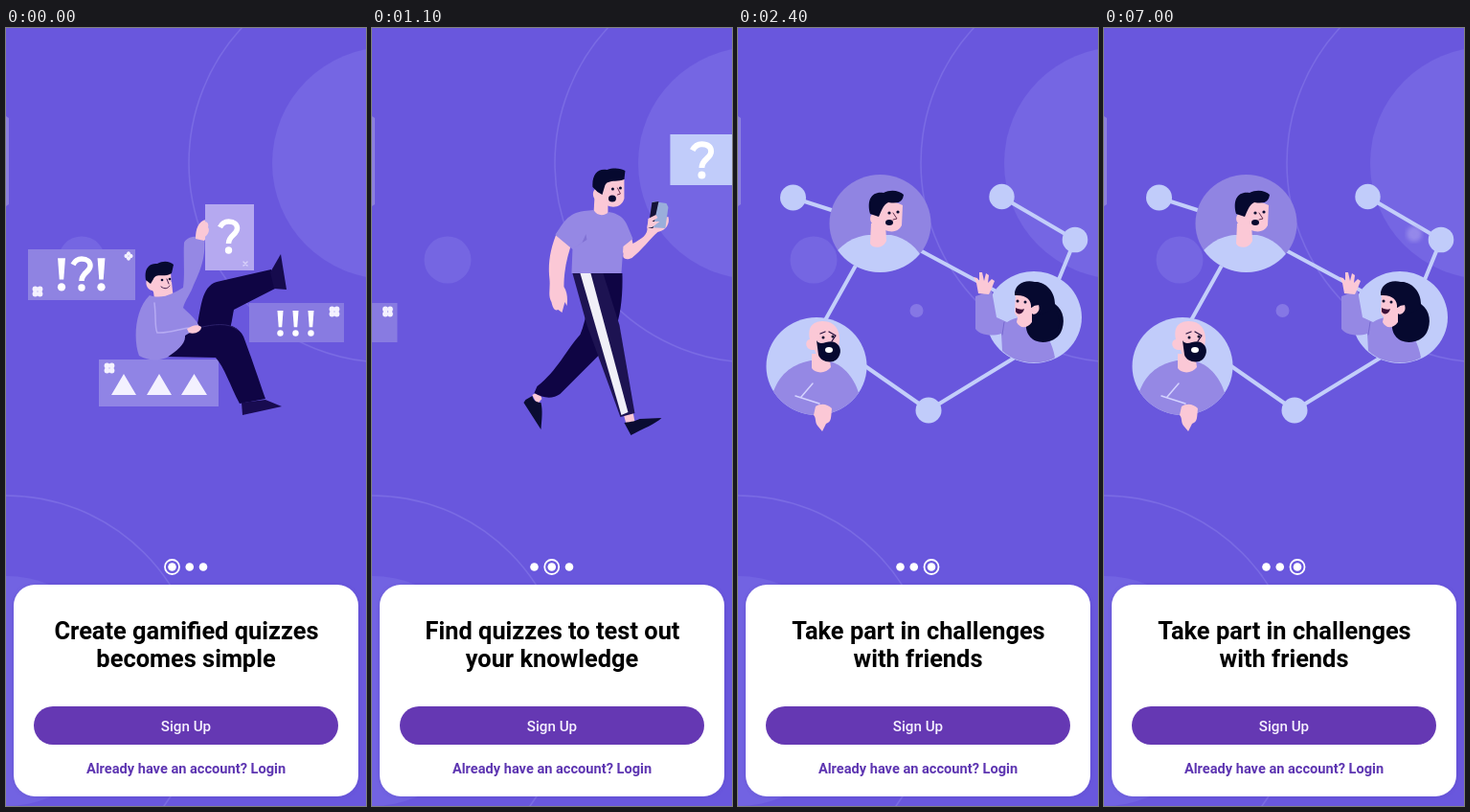
These frames come from a looping animation (376 px wide and 812 px high, 7.1 s). An HTML page:

```html
<!DOCTYPE html>
<html lang="en">
<head>
<meta charset="utf-8">
<title>Quiz onboarding</title>
<style>
html, body { margin: 0; width: 100%; height: 100%; overflow: hidden; background: #6957dd; }
svg { display: block; width: 100%; height: 100%; }
text { font-family: Roboto, Arial, sans-serif; text-anchor: middle; }
.title { font-size: 25.4px; font-weight: 700; }
.off { visibility: hidden; }
.skin { fill: #fbc8d6; }
.ink { fill: #06092f; }
.navy { fill: #0f0544; }
.shirt { fill: #9588e4; }
.pale { fill: #c1ccfa; }
.line { fill: none; stroke-linecap: round; stroke-linejoin: round; }
</style>
</head>
<body>
<svg viewBox="0 0 376 812">
  <defs>
    <g id="bang"><path d="M-3.500-15H3.500L2 5H-2Z"/><circle cy="12" r="3.700"/></g>
    <g id="ask">
      <path class="line" stroke="#fff" stroke-width="5.500" style="stroke-linecap:butt" d="M-9-10C-7-14-4-16 0-16C6-16 9-13 9-9C9-2 0-2 0 7"/>
      <circle cy="14" r="3.700" fill="#fff"/>
    </g>
    <g id="clover" fill="#f4f2ff">
      <circle cx="-2.500" cy="-2.500" r="2.900"/><circle cx="2.500" cy="-2.500" r="2.900"/>
      <circle cx="-2.500" cy="2.500" r="2.900"/><circle cx="2.500" cy="2.500" r="2.900"/>
    </g>
    <clipPath id="c1"><ellipse cx="148.500" cy="204" rx="53" ry="51"/></clipPath>
    <clipPath id="c2"><ellipse cx="82" cy="353" rx="52.500" ry="51"/></clipPath>
    <filter id="soft" x="-10%" y="-10%" width="120%" height="120%"><feGaussianBlur stdDeviation="2"/></filter>
  </defs>

  <rect width="376" height="812" fill="#6957dd"/>
  <circle cx="399" cy="141" r="121" fill="#7566e3"/>
  <circle cx="0" cy="692" r="120" fill="#7263e2"/>
  <g fill="none" stroke="#7a6be4" stroke-width="1.600">
    <circle cx="399" cy="141" r="208"/><circle cx="0" cy="692" r="204"/>
  </g>
  <circle cx="79" cy="242" r="24.500" fill="#7566e2"/>
  <path d="M0 92L3 94V184L0 186Z" fill="#8b7fdf"/>

  <g id="pages">
    <g>
      <rect x="23" y="231" width="112" height="53" fill="#8f83e2"/>
      <rect x="254" y="287" width="99" height="41" fill="#887be1"/>
      <rect x="97" y="346" width="125" height="49" fill="#9084e5"/>
      <g fill="#fff">
        <use href="#bang" transform="translate(58 257) scale(1.120)"/>
        <use href="#bang" transform="translate(99.500 257) scale(1.120)"/>
        <use href="#bang" transform="translate(286.500 308) scale(.87)"/>
        <use href="#bang" transform="translate(302.500 308) scale(.87)"/>
        <use href="#bang" transform="translate(318.500 308) scale(.87)"/>
      </g>
      <use href="#ask" transform="translate(79 257)"/>
      <use href="#clover" transform="translate(128 238) rotate(45) scale(.7)"/>
      <use href="#clover" x="33" y="275"/>
      <use href="#clover" x="343" y="296"/>
      <use href="#clover" x="108" y="355"/>
      <path d="M110 383L123 361L136 383ZM147 383L160 361L173 383ZM183 383L196.500 361L210 383Z" fill="#f3f1ff"/>

      <path class="navy" d="M199 314C204 291 204 270 220 265L277 252L281 272L238 294C236 303 236 310 232 318Z"/>
      <path d="M276 255L287 236L293 273L280 272Z" fill="#160b4d"/>
      <path class="navy" d="M168 343C178 333 186 315 204 311C225 306 242 309 248 322C256 343 265 370 271 387L244 392C234 373 228 354 219 344Z"/>
      <path d="M246 391L271 388L288 395L247 404Z" fill="#180b50"/>
      <path class="line" d="M201 313C217 309 232 307 242 315" stroke="#2b2069"/>

      <path class="skin" d="M153 268L173 265L175 284L156 290Z"/>
      <path class="shirt" d="M150 279C164 284 176 276 185 271C187 256 185 239 186 224C190 217 199 217 207 219C209 239 203 253 196 268C193 277 187 284 185 292C191 298 199 304 202 312L187 321C188 330 178 337 168 344C158 348 148 347 139 342C133 327 134 294 150 279Z"/>
      <path class="line" d="M155 287C157 302 155 313 158 318C170 319 181 314 191 313" stroke="#b6abf3" stroke-width="1.500"/>
      <path class="skin" d="M189 314C195 310 200 309 204 312C204 317 197 320 191 318Z"/>
      <path class="skin" d="M148 262C149 254 155 252 172 253L173 273C172 280 157 281 153 274C146 273 145 264 148 262Z"/>
      <path class="ink" d="M146 263C144 252 149 245 158 246C165 242 172 244 175 247L173 256C165 261 157 255 154 262L151 267Z"/>
      <circle class="ink" cx="163" cy="263" r="1.300"/><circle class="ink" cx="171" cy="262" r="1.300"/>
      <path class="line" d="M162 270C166 273 169 272 171 269M168 262L170 267" stroke="#44204d" stroke-width="1"/>

      <path class="skin" d="M198 220C198 210 201 201 209 200L213 208C211 213 210 219 207 222Z"/>
      <rect x="208" y="184" width="51" height="69" fill="#b5a9f0"/>
      <path class="skin" d="M206 203C211 200 212 206 211 208C214 212 209 219 205 219Z"/>
      <use href="#ask" transform="translate(232.500 218)"/>
      <path class="line" d="M248 244L252 248M252 244L248 248" stroke="#d8d1fa" stroke-width="1.500"/>
    </g>

    <g transform="translate(380)">
      <rect class="pale" x="258" y="111" width="68" height="53"/>
      <use href="#ask" transform="translate(291 138.500) scale(1.080)"/>
      <path class="skin" d="M114 383L121 379L124 387L119 393ZM209 402L219 400L221 411L212 413Z"/>
      <path d="M107 388L114 384C115 389 119 391 123 391C125 399 124 408 123 419L105 391Z" fill="#0a0c32"/>
      <path d="M210 412C218 411 222 410 226 408L249 407C243 413 230 418 217 425Z" fill="#0a0c32"/>
      <path class="navy" d="M179 256H208C209 292 203 317 191 334L143 382C136 387 126 387 116 381L119 374C140 358 150 335 164 320C171 304 174 276 179 256Z"/>
      <path d="M156 256H188L205 310L221 402L206 406L171 310Z" fill="#1d1352"/>
      <path d="M164 256H175L214 401L207 404Z" fill="#f0eff8"/>

      <path class="skin" d="M140 213L156 222C151 237 147 251 147 270C151 276 151 285 150 290L148 286L145 297L141 294C137 296 135 291 134 286C130 279 133 272 132 262C130 246 133 229 140 213Z"/>
      <path class="skin" d="M207 224L218 220L219 225C228 220 235 216 234 208C235 200 240 197 247 199L256 197C258 204 254 211 245 213C237 220 228 232 218 240C211 243 208 240 209 236Z"/>
      <path d="M240 181L254 183L256 187L253 209L236 208Z" fill="#9aaedb"/>
      <path d="M239 182L246 181L240 209H235Z" fill="#141236"/>
      <path class="skin" d="M235 199L243 195L245 198L239 202L247 202L239 208L234 209Z"/>
      <path class="skin" d="M179 177H193V195C188 199 181 198 178 194Z"/>
      <path class="shirt" d="M168 191L178 190C182 197 190 196 194 192C206 194 211 200 214 208L219 220L209 228L207 256H155L156 231L138 216C146 204 151 193 168 191Z"/>
      <path d="M155 231L166 224L170 215L171 221Z" fill="#8172d4"/>
      <path class="skin" d="M182 160C189 152 203 155 210 158V178C207 189 193 189 187 181C178 183 174 171 181 167Z"/>
      <path class="ink" d="M177 166C176 152 183 146 192 148C200 145 207 147 211 149L210 158C203 161 193 158 190 164L187 174L182 171Z"/>
      <circle class="ink" cx="198" cy="168" r="1.500"/><circle class="ink" cx="206" cy="167" r="1.500"/>
      <ellipse class="ink" cx="197.500" cy="178" rx="4" ry="3.500"/>
      <path class="line" d="M203 167L206 173L203 174" stroke="#6e314f"/>
    </g>

    <g transform="translate(760)">
      <circle cx="186.500" cy="295" r="7" fill="#8577e5"/>
      <path class="line" d="M57 177L110 194M124 246L91 305M190 232L268 274M133 353L199 399L289 344M275 176L352 221L334 265" stroke="#c3cefa" stroke-width="4"/>
      <g class="pale">
        <circle cx="57.500" cy="177" r="13.500"/><circle cx="275.500" cy="176" r="13.200"/>
        <circle cx="352" cy="221" r="13.300"/><circle cx="199" cy="399" r="13.500"/>
      </g>

      <g clip-path="url(#c1)">
        <rect x="95" y="152" width="107" height="104" fill="#9084e2"/>
        <path class="pale" d="M97 241C109 223 125 216 139 216H160C176 219 188 230 194 243V258H97Z"/>
      </g>
      <path class="skin" d="M139 204H154L155 222C152 230 141 231 138 225Z"/>
      <path class="skin" d="M143 185C151 178 163 181 172 185L171 206C166 216 153 213 148 206C138 208 135 196 142 193Z"/>
      <path class="ink" d="M138 194C134 179 140 170 152 172C160 168 169 170 173 174C172 180 170 184 157 182C151 185 150 191 147 197Z"/>
      <circle class="ink" cx="158" cy="193" r="1.600"/><circle class="ink" cx="167" cy="192" r="1.600"/>
      <ellipse class="ink" cx="158" cy="203" rx="4" ry="3"/>
      <path class="line" d="M162 193L166 199L162 200" stroke="#63314f"/>

      <g clip-path="url(#c2)">
        <rect x="29" y="301" width="107" height="105" class="pale"/>
        <path class="shirt" d="M36 382C43 362 54 352 76 347L96 348C111 352 122 366 127 384L112 406H46Z"/>
      </g>
      <path class="skin" d="M77 340H95L97 354C92 361 81 361 77 355Z"/>
      <path class="skin" d="M75 325C72 310 80 306 89 306C101 306 106 315 106 325L104 341C98 349 83 348 80 336C70 337 69 326 75 325Z"/>
      <path class="ink" d="M82 326C86 333 94 325 101 328C108 331 109 340 103 346C97 351 86 348 84 341Z"/>
      <ellipse cx="95" cy="336" rx="4" ry="3" fill="#fff"/>
      <circle class="ink" cx="89" cy="323" r="1.500"/><circle class="ink" cx="99" cy="322" r="1.500"/>
      <path class="line" d="M86 319L91 317M95 317L102 321L98 327" stroke="#27123f" stroke-width="1.300"/>
      <path class="line" d="M78 371L66 385M60 384L85 392" stroke="#d5d3ff" stroke-width="1.500"/>
      <path class="skin" d="M81 395C87 391 94 393 98 397C97 406 98 411 92 413L88 421L83 415C80 411 82 407 79 404Z"/>

      <ellipse cx="309" cy="302" rx="50" ry="48" class="pale"/>
      <path class="ink" d="M299 268C315 259 331 271 331 288C341 295 342 308 337 318C330 330 313 331 303 320L299 304Z"/>
      <path class="shirt" d="M248 280L265 274L270 302L281 307C289 301 299 301 308 305C322 316 329 331 331 344C318 352 292 352 276 337L275 319C266 322 253 321 248 314Z"/>
      <path class="ink" d="M304 292H330C338 301 337 319 325 327C311 331 299 322 301 307Z"/>
      <path class="skin" d="M293 297H307V307C301 315 294 313 291 307Z"/>
      <path class="skin" d="M290 276C298 271 308 277 312 287C317 289 314 299 307 298C302 306 291 304 289 297Z"/>
      <path class="ink" d="M289 279C288 268 299 262 310 265C323 266 330 278 331 292L316 300C314 294 318 290 314 289L306 292C307 284 301 278 289 279Z"/>
      <path class="skin" d="M307 292C311 287 316 290 314 295C312 299 308 300 306 297Z"/>
      <circle class="ink" cx="292" cy="285" r="1.500"/><circle class="ink" cx="300" cy="286" r="1.500"/>
      <path d="M290 292C294 294 297 294 299 293C298 299 292 300 290 296Z" fill="#3c1038"/>
      <path class="line" d="M278 307L276 320" stroke="#7769d0"/>
      <path class="skin" d="M251 277L249 266L246 260L250 261L252 265L252 255L255 255L257 264L259 256L262 258L261 266L265 262L268 264L264 274L262 278Z"/>
    </g>
  </g>

  <circle id="touch" cy="443.500" r="9.500" class="off" fill="#8475e6"/>
  <circle id="press" cx="324" cy="215" r="8" class="off" fill="#aaa0ef" opacity=".6" filter="url(#soft)"/>

  <g fill="#fff">
    <circle class="dot" cy="562.500" r="4.300"/><circle class="dot" cy="562.500" r="4.300"/><circle class="dot" cy="562.500" r="4.300"/>
    <circle id="ring" cy="562.500" r="7.500" fill="none" stroke="#fff" stroke-width="1.800"/>
  </g>

  <rect x="8" y="582" width="360" height="220" rx="22" fill="#3c2a9a" opacity=".25" filter="url(#soft)"/>
  <rect x="8" y="581" width="360" height="221" rx="22" fill="#fff"/>
  <g class="title"><text x="188.500" y="638">Create gamified quizzes</text><text x="188" y="667">becomes simple</text></g>
  <g class="title off"><text x="188.500" y="638">Find quizzes to test out</text><text x="188" y="667">your knowledge</text></g>
  <g class="title off"><text x="188.500" y="638">Take part in challenges</text><text x="188" y="667">with friends</text></g>
  <rect x="29" y="708" width="318" height="40" rx="20" fill="#6538b3"/>
  <text x="188" y="733.500" font-size="15.200" font-weight="500" fill="#f6f1ff">Sign Up</text>
  <text x="188" y="777.500" font-size="14.600" font-weight="700" fill="#5d35b1">Already have an account? Login</text>
</svg>
<script>
const LOOP = 7100, STEP = 100, PITCH = 380, SWIPE = 480;
const $ = id => document.getElementById(id);
const titles = document.querySelectorAll('.title');
const dots = document.querySelectorAll('.dot');

// Ease-out page swipe, 0 to 1
function swipe(t, start) {
  const p = Math.min(1, Math.max(0, (t - start) / SWIPE));
  return 1 - (1 - p) ** 2;
}

// The ringed dot takes more room than its neighbours
function dotX(i, page) {
  const extra = i < page ? 0 : i === page ? 4 : 8;
  return 169.5 + 14.25 * i + extra;
}

function draw(now) {
  const t = Math.floor((now % LOOP) / STEP) * STEP;
  const pos = swipe(t, 800) + swipe(t, 1700);
  const page = Math.round(pos);
  $('pages').setAttribute('transform', `translate(${-pos * PITCH})`);
  titles.forEach((g, i) => g.classList.toggle('off', i !== page));
  dots.forEach((d, i) => d.setAttribute('cx', dotX(i, page)));
  $('ring').setAttribute('cx', dotX(page, page));

  $('touch').classList.toggle('off', t < 900 || t > 1000);
  $('touch').setAttribute('cx', 197 + (0.66 - pos) * PITCH);
  $('press').classList.toggle('off', t < 7000);
}

function tick() {
  draw(performance.now());
  requestAnimationFrame(tick);
}
tick();
</script>
</body>
</html>
```
